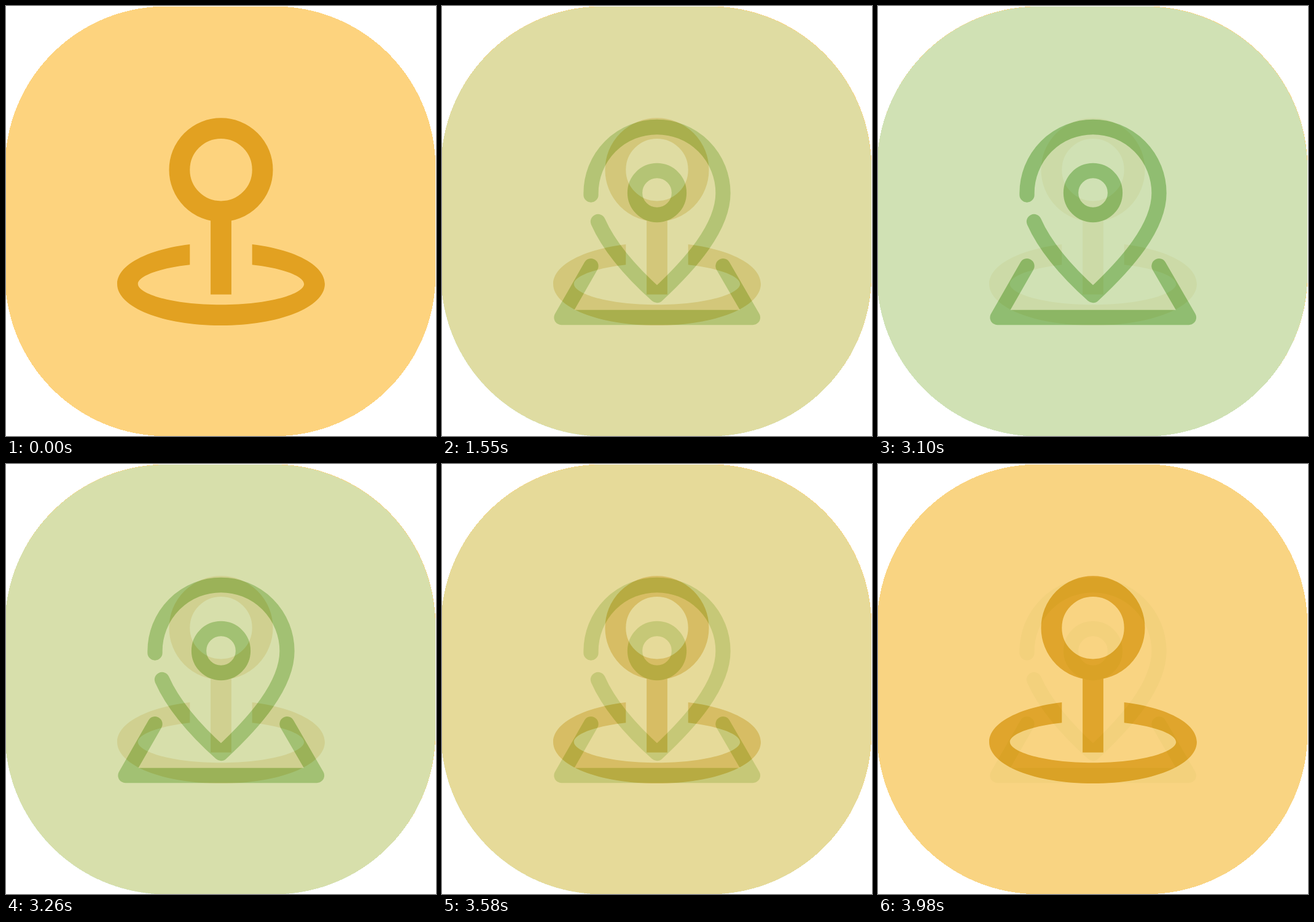
Animation of 700x700 px, one loop 4.06 s. Source, as an HTML page with a canvas:

```html
<!DOCTYPE html>
<html lang="en">
<head>
<meta charset="utf-8">
<title>Location pins</title>
<style>
  html, body { margin: 0; width: 100%; height: 100%; overflow: hidden; background: #fff; }
  canvas { display: block; width: 100%; height: 100%; }
</style>
</head>
<body>
<canvas id="stage" width="700" height="700"></canvas>
<script>
const SIZE = 700;
const LOOP = 4060;
const HOLD = 1070;
const FADE_IN = HOLD;
const GREEN_FULL = 2030;
const FADE_OUT = GREEN_FULL + HOLD;
const STEPS = 14;

const ctx = document.getElementById('stage').getContext('2d');

// Rounded tile built row by row, so that its edge stays hard
function fillTile(c, left, top, right, bottom, radius) {
  for (let y = 0; y < SIZE; y++) {
    const mid = y + 0.5;
    if (mid < top || mid > bottom) continue;
    const d = Math.max(0, top + radius - mid, mid - bottom + radius);
    const inset = radius - Math.sqrt(radius * radius - d * d);
    const x = Math.round(left + inset);
    c.fillRect(x, y, Math.round(right - inset) - x, 1);
  }
}

function makeLayer(fill, ink, box, drawIcon) {
  const canvas = document.createElement('canvas');
  canvas.width = canvas.height = SIZE;
  const c = canvas.getContext('2d');
  c.fillStyle = fill;
  fillTile(c, ...box, 262);
  c.fillStyle = c.strokeStyle = ink;
  drawIcon(c);
  return canvas;
}

// Oval from four curves; hx and hy are the handle lengths relative to the radii
function addOval(c, x, y, rx, ry, hx, hy) {
  c.moveTo(x - rx, y);
  for (const [sx, sy] of [[-1, 1], [1, -1]]) {
    const y1 = y + sy * ry;
    c.bezierCurveTo(x + sx * rx, y + sy * ry * hy, x + sx * rx * hx, y1, x, y1);
    c.bezierCurveTo(x - sx * rx * hx, y1, x - sx * rx, y + sy * ry * hy, x - sx * rx, y);
  }
}

function drawRoundPin(c) {
  c.lineWidth = 33.8;
  c.beginPath();
  c.arc(350, 266.7, 67.6, 0, Math.PI * 2);
  c.stroke();
  c.fillRect(333.1, 340, 33.8, 129.6);

  // Ground ring, open behind the stem
  c.save();
  c.beginPath();
  c.rect(0, 0, 299.3, SIZE);
  c.rect(400.7, 0, 299.3, SIZE);
  c.rect(0, 452.5, SIZE, 100);
  c.clip();
  c.beginPath();
  addOval(c, 350, 452.5, 169, 67.6, 0.561, 0.561);
  addOval(c, 350, 452.5, 135.2, 33.8, 0.589, 0.473);
  c.fill('evenodd');
  c.restore();
}

function drawMapPin(c) {
  c.lineWidth = 24.3;
  c.lineCap = c.lineJoin = 'round';
  const outline = 'M242.5 307.5V304.5A107.5 107.5 0 0 1 457.5 304.5' +
    'C457.5 360 405 420 350 471C311 436 273 394 254 351';
  const base = 'M242.5 423.3L194.5 507H506L457.5 423.3';
  c.stroke(new Path2D(outline));
  c.stroke(new Path2D(base));
  c.beginPath();
  c.arc(350, 304, 36, 0, Math.PI * 2);
  c.stroke();
}

const yellow = makeLayer('#fdd37e', '#e2a121', [-1.5, 0.6, 699.2, 700.2], drawRoundPin);
const green = makeLayer('#c9e4bd', '#7fba6f', [-1.7, 1.2, 698.8, 700.6], drawMapPin);

function greenAmount(t) {
  if (t < FADE_IN) return 0;
  if (t < GREEN_FULL) return (2 + Math.floor((t - FADE_IN) / 80)) / STEPS;
  if (t < FADE_OUT) return 1;
  // The way back moves two steps at a time, then one last single step
  const faded = t < 3980 ? 2 + 2 * Math.floor((t - FADE_OUT) / 160) : 13;
  return 1 - faded / STEPS;
}

function render(now) {
  ctx.globalAlpha = 1;
  ctx.fillStyle = '#fff';
  ctx.fillRect(0, 0, SIZE, SIZE);
  ctx.drawImage(yellow, 0, 0);
  ctx.globalAlpha = greenAmount(now % LOOP);
  ctx.drawImage(green, 0, 0);
}

const start = performance.now();
function tick() {
  render(performance.now() - start);
  requestAnimationFrame(tick);
}
tick();
</script>
</body>
</html>
```
